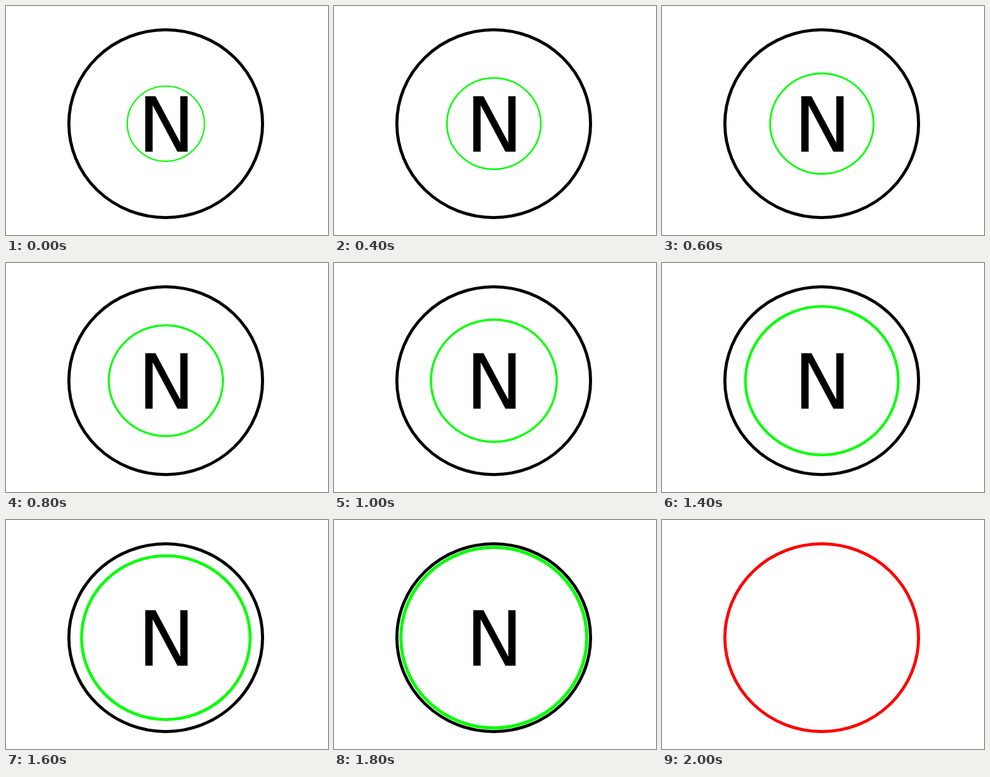
These frames come from a looping animation (504x360 px, 2.5 s). An HTML page:

```html
<!DOCTYPE html>
<html lang="en">
<head>
<meta charset="utf-8">
<style>
  html, body { margin: 0; width: 100%; height: 100%; overflow: hidden; background: #fff; }
  svg { display: block; }
  ellipse { fill: none; }
  text { font: 120px "DejaVu Sans", sans-serif; }
</style>
</head>
<body>
<svg width="504" height="360" viewBox="0 0 504 360">
  <ellipse id="rim" cx="250" cy="185"/>
  <text id="letter" x="206.2" y="229">N</text>
  <ellipse id="wave" cx="250.2" cy="185" stroke="#0f0"/>
</svg>
<script>
const LOOP = 2500, STEP = 100, LAST = 20, GROWTH = 1.05;
const [rim, letter, wave] = ["rim", "letter", "wave"].map(id => document.getElementById(id));

// Sets an ellipse by its outer radii, keeping the stroke inside them.
function setRing(ring, outerX, outerY, width) {
  ring.setAttribute("rx", outerX - width / 2);
  ring.setAttribute("ry", outerY - width / 2);
  ring.setAttribute("stroke-width", width);
}

function draw(now) {
  const step = Math.min(LAST, Math.floor(now % LOOP / STEP));
  const scale = GROWTH ** step;
  const done = step === LAST;
  rim.setAttribute("stroke", done ? "#f00" : "#000");
  letter.style.display = wave.style.display = done ? "none" : "";
  // The wave stops growing when it reaches the rim.
  setRing(wave, Math.min(154, 61.5 * scale), Math.min(150, 60 * scale), Math.min(5, 2.1 * scale));
  requestAnimationFrame(draw);
}

setRing(rim, 154, 150, 4.8);
draw(performance.now());
</script>
</body>
</html>
```
